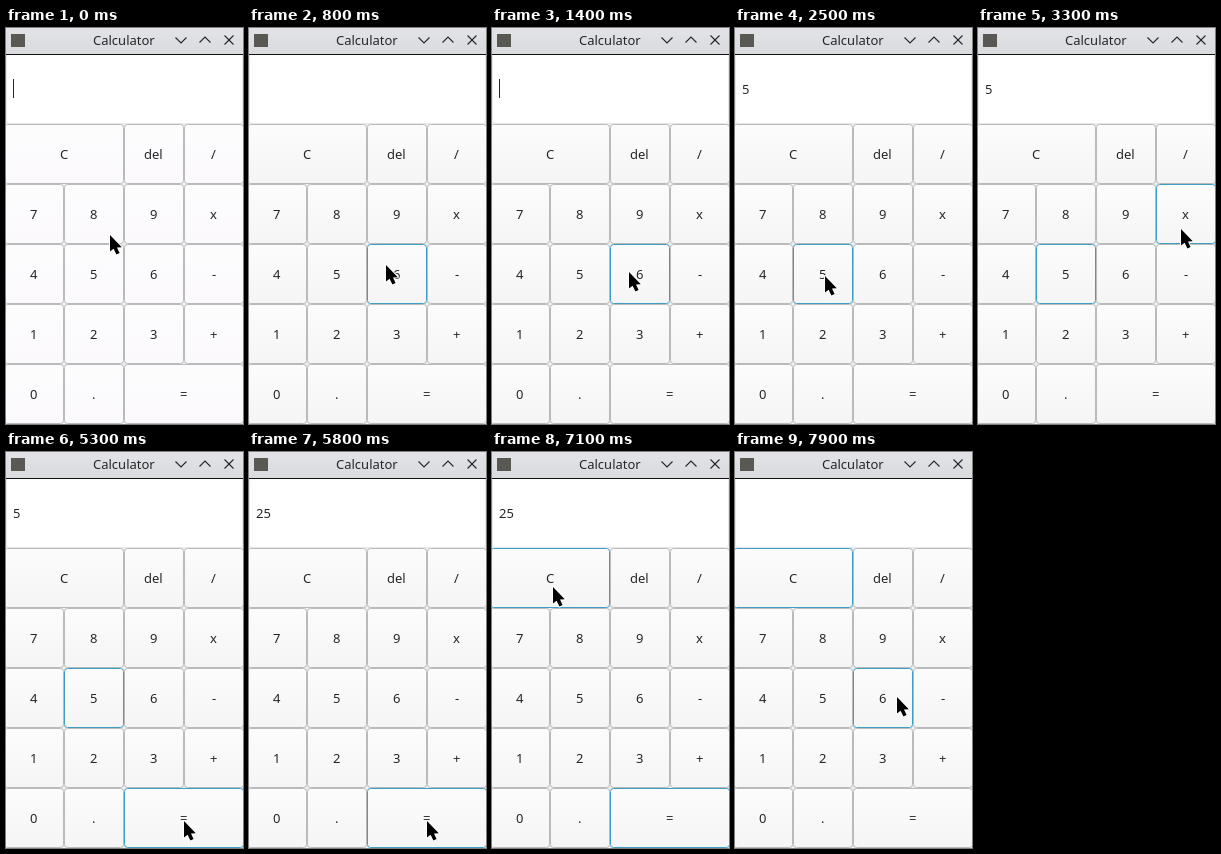
Animation of 237 by 396 pixels, one loop 8 s. Source, as an HTML page with a canvas:

```html
<!DOCTYPE html>
<html lang="en">
<head>
<meta charset="utf-8">
<title>Calculator</title>
<style>
  html, body { margin: 0; width: 100%; height: 100%; overflow: hidden; background: #fff; }
  canvas { display: block; }
</style>
</head>
<body>
<canvas id="stage" width="237" height="396"></canvas>
<script>
const ctx = document.getElementById('stage').getContext('2d');
const LOOP = 8000, STEP = 100, BLINK = 500;
const WIDTH = 237, HEIGHT = 396, CELL = 60, LEFT = -2, TOP = 96;
const INK = '#232627';

// A repeated label widens its button.
const layout = ['C C del /', '7 8 9 x', '4 5 6 -', '1 2 3 +', '0 . = ='];
const buttons = layout.flatMap((row, r) => {
  const labels = row.split(' ');
  return [...new Set(labels)].map(label => ({
    label,
    x: LEFT + labels.indexOf(label) * CELL,
    y: TOP + r * CELL,
    w: labels.filter(other => other === label).length * CELL,
    h: CELL
  }));
});

const home = { x: 104, y: 206 };
const moves = [
  { from: 600, to: 1100, x: 198, y: 290 },
  { from: 1100, to: 1400, x: 137, y: 243 },
  { from: 1400, to: 1700, x: 90, y: 247 },
  { from: 2700, to: 3300, x: 203, y: 200 },
  { from: 3900, to: 4300, x: 88, y: 243 },
  { from: 4900, to: 5300, x: 178, y: 368 },
  { from: 6600, to: 7100, x: 61, y: 134 },
  { from: 7700, to: 7900, x: 162, y: 244 }
];
const clicks = [
  { press: 2400, release: 2500, key: '5', shows: '5' },
  { press: 3600, release: 3700, key: 'x', shows: '' },
  { press: 4500, release: 4700, key: '5', shows: '5' },
  { press: 5700, release: 5800, key: '=', shows: '25' },
  { press: 7300, release: 7500, key: 'C', shows: '' }
];

function pointerAt(t) {
  return moves.reduce((at, move) => {
    const k = Math.min(1, Math.max(0, (t - move.from) / (move.to - move.from)));
    const eased = k * k * (3 - 2 * k);
    return { x: at.x + (move.x - at.x) * eased, y: at.y + (move.y - at.y) * eased };
  }, home);
}

function contains({ x, y, w, h }, point) {
  return point.x >= x && point.x < x + w && point.y >= y && point.y < y + h;
}

function trace(points) {
  ctx.beginPath();
  points.forEach(([x, y]) => ctx.lineTo(x, y));
}

function gradient(y, h, top, bottom) {
  const fill = ctx.createLinearGradient(0, y, 0, y + h);
  fill.addColorStop(0, top);
  fill.addColorStop(1, bottom);
  return fill;
}

function box(x, y, w, h, fill, stroke) {
  ctx.beginPath();
  ctx.roundRect(x + 0.5, y + 0.5, w - 1, h - 1, 3);
  ctx.fillStyle = fill;
  ctx.fill();
  ctx.strokeStyle = stroke;
  ctx.lineWidth = 1;
  ctx.stroke();
}

function text(label, x, y) {
  ctx.fillStyle = INK;
  ctx.fillText(label, x, y);
}

// Labels start on a whole pixel.
function centredText(label, center, y) {
  const width = Math.round(ctx.measureText(label).width);
  text(label, Math.floor(center - width / 2), y);
}

function drawTitleBar() {
  ctx.fillStyle = gradient(0, 26, '#e1e3e6', '#d9dbde');
  ctx.fillRect(0, 0, WIDTH, 26);
  ctx.fillStyle = '#111';
  ctx.fillRect(0, 26, WIDTH, 1);
  ctx.fillStyle = '#5a5852';
  ctx.fillRect(5, 6, 14, 13);
  centredText('Calculator', 118, 17);

  ctx.strokeStyle = INK;
  ctx.lineWidth = 1.1;
  const icons = [
    [[169.5, 9.5], [175, 15], [180.5, 9.5]],
    [[193.5, 14.5], [199, 9], [204.5, 14.5]],
    [[218.5, 7.5], [227.5, 16.5]],
    [[218.5, 16.5], [227.5, 7.5]]
  ];
  for (const icon of icons) {
    trace(icon);
    ctx.stroke();
  }
}

function drawDisplay(value, caret) {
  box(0, 27, WIDTH, 69, '#fff', '#e6e7e8');
  ctx.fillStyle = '#fff';
  ctx.fillRect(1, 27, WIDTH - 2, 6);
  text(value, 7, 66);
  if (caret) ctx.fillRect(7, 51, 1, 19);
}

function drawButton({ label, x, y, w, h }, lit, held, pale) {
  const fill = held ? '#eeeff0' : gradient(y, h, '#fdfcfd', pale ? '#fbf9fc' : '#f5f5f5');
  box(x, y, w, h, fill, lit ? '#3f9dc4' : '#b9babb');
  centredText(label, x + w / 2, y + 35);
}

function drawPointer({ x, y }) {
  ctx.save();
  ctx.translate(Math.round(x), Math.round(y) + 1);
  trace([[0, 0], [0, 16.5], [3.6, 13.8], [6.4, 19.5], [9.6, 18], [7, 12.6], [11.8, 12.2]]);
  ctx.closePath();
  ctx.lineJoin = 'round';
  ctx.strokeStyle = '#fff';
  ctx.lineWidth = 2;
  ctx.stroke();
  ctx.fillStyle = '#000';
  ctx.fill();
  ctx.restore();
}

function draw(t) {
  const pointer = pointerAt(t);
  const last = clicks.findLast(click => t >= click.press);
  const done = clicks.findLast(click => t >= click.release);
  const isFocused = b => last?.key === b.label;
  const isLit = b => isFocused(b) || (t > moves[0].from && contains(b, pointer));

  ctx.font = '13px "Noto Sans", sans-serif';
  ctx.fillStyle = '#eff0f1';
  ctx.fillRect(0, 0, WIDTH, HEIGHT);
  drawTitleBar();
  drawDisplay(done?.shows ?? '', !last && t % (2 * BLINK) < BLINK);

  // Lit buttons go on top so their outline stays whole.
  const ordered = [...buttons].sort((a, b) => isLit(a) - isLit(b));
  for (const b of ordered) {
    drawButton(b, isLit(b), isFocused(b) && t < last.release, t < 300);
  }
  drawPointer(pointer);
}

function tick() {
  const t = performance.now() % LOOP;
  draw(Math.floor(t / STEP) * STEP);
  requestAnimationFrame(tick);
}
tick();
</script>
</body>
</html>
```
